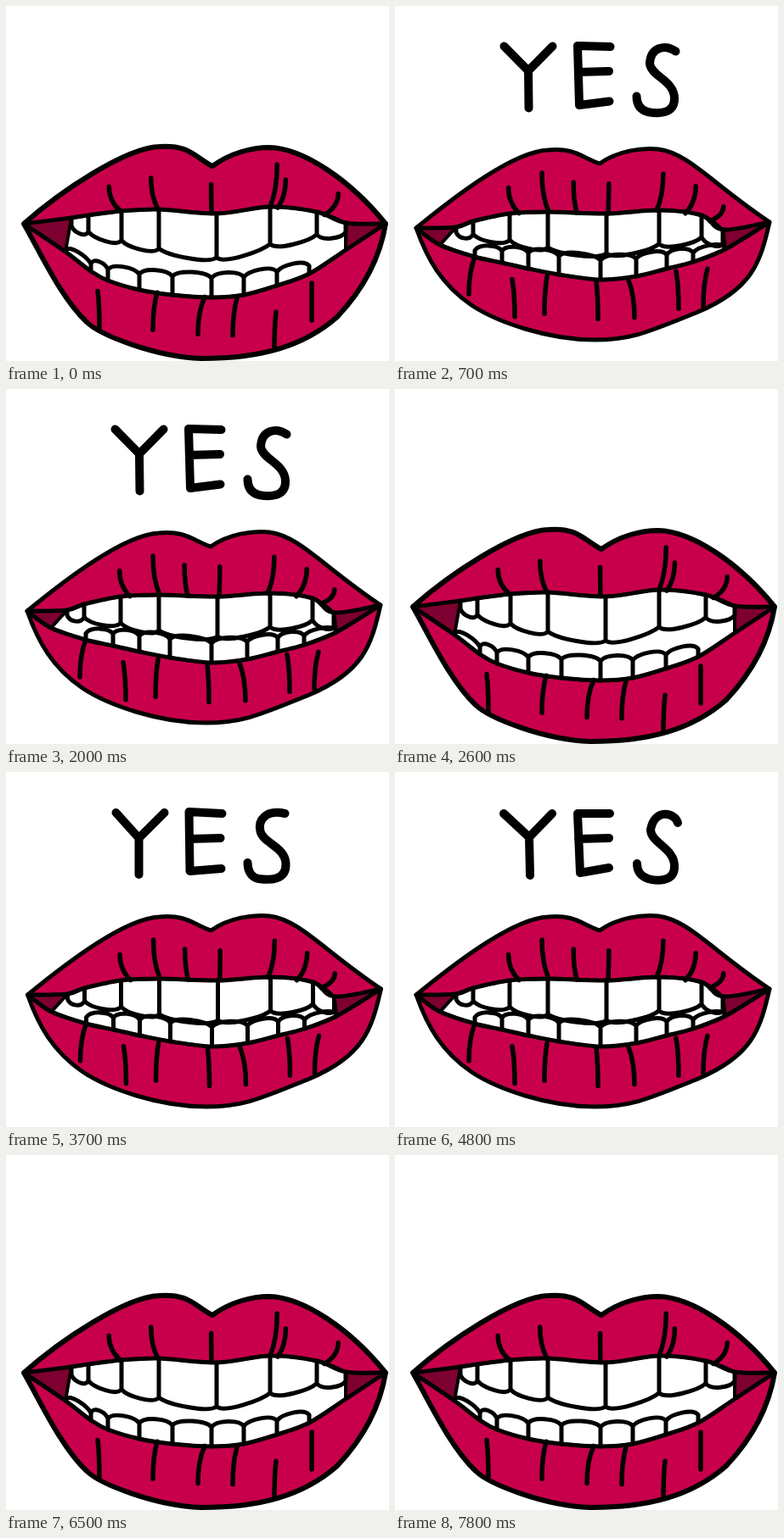
An HTML page with a canvas for the animation above (8 s loop, 451 by 419 pixels).

```html
<!DOCTYPE html>
<html lang="en">
<head>
<meta charset="utf-8">
<title>Yes</title>
<style>
html, body { margin: 0; width: 100%; height: 100%; overflow: hidden; background: #fff; }
canvas { display: block; }
</style>
</head>
<body>
<canvas id="stage" width="451" height="419"></canvas>
<script>
const ctx = document.getElementById("stage").getContext("2d");
const RED = "#c8004b", DARK = "#7d0030";

// Each shape has two poses with matching numbers, so it can be blended.
const lips = [
  `M21,257 C65,218 140,168 180,166 C215,163 222,178 243,189
   C265,173 290,167 310,167 C350,168 405,205 447,257
   C440,300 420,335 390,367 C350,402 300,416 230,416
   C175,414 110,388 95,373 C65,345 40,290 21,257 Z`,
  `M25,263 C75,222 140,173 180,171 C212,168 220,180 241,187
   C262,172 290,168 310,170 C345,174 375,212 441,256
   C430,305 420,335 357,362 C300,385 280,395 235,395
   C180,395 120,374 90,354 C55,330 38,300 25,263 Z`];

// Inner lip edges; their points are also the gaps between the teeth.
const upperEdge = [
  "21,257 77,250 97,247 136,242 180,240 248,245 311,237 366,243 400,256 447,257",
  "25,263 72,262 92,255 135,246 180,244 249,246 311,242 361,248 386,265 441,256"];
const lowerEdge = [
  "21,257 70,290 100,313 120,324 157,335 196,341 242,344 280,341 319,330 357,316 400,288 447,257",
  "25,263 53,283 94,297 126,304 157,311 193,318 242,324 284,320 320,311 351,303 389,288 441,256"];

const word = [
  `M129,48 L156,78 L186,48 M156,78 L156,121
   M254,49 L215,47 L216,117 L253,114 M216,79 L252,78
   M328,49 C305,44 296,57 299,70 C302,84 328,88 329,108
   C330,128 310,128 297,126 C287,124 284,115 284,107`,
  `M128,49 L158,77 L185,49 M158,77 L159,122
   M253,49 L215,49 L218,119 L252,113 M216,79 L252,78
   M333,60 C330,48 306,42 301,68 C301,84 330,90 329,112
   C329,130 308,129 298,126 C287,122 285,115 285,108`];

// Creases: [x, length] above the mouth, [x, gap, lean] below it.
const openCreases = {
  upper: [[135, 29], [179, 37], [242, 34], [311, 50], [320, 33], [375, 25]],
  lower: [[108, 19, 2], [178, 0, -5], [234, 0, -8], [272, 3, -5], [318, 31, -2], [360, 13, 0]]
};
const closedCreases = {
  upper: [[146, 30], [181, 46], [214, 36], [251, 35], [308, 43], [342, 32], [371, 17]],
  lower: [[94, 0, -7], [138, 17, 3], [179, 5, -3], [237, 3, 2], [275, 4, 7], [331, 6, 3], [368, 15, -5]]
};

const lerp = (a, b, k) => a + (b - a) * k;

function blend([from, to], k) {
  const ends = to.match(/\d+/g);
  let i = 0;
  return from.replace(/\d+/g, n => lerp(+n, +ends[i++], k));
}

const blendPoints = (pair, k) =>
  blend(pair, k).split(" ").map(p => p.split(",").map(Number));

// Catmull-Rom curve through the points.
function curve(path, points, join) {
  if (!join) path.moveTo(...points[0]);
  for (let i = 0; i < points.length - 1; i++) {
    const b = points[i], c = points[i + 1];
    const a = points[i - 1] || b, d = points[i + 2] || c;
    path.bezierCurveTo(
      b[0] + (c[0] - a[0]) / 6, b[1] + (c[1] - a[1]) / 6,
      c[0] - (d[0] - b[0]) / 6, c[1] - (d[1] - b[1]) / 6, ...c);
  }
}

function between(top, bottom) {
  const path = new Path2D();
  curve(path, top);
  path.lineTo(...bottom.at(-1));
  curve(path, [...bottom].reverse(), true);
  path.closePath();
  return path;
}

function fill(path, color) {
  ctx.fillStyle = color;
  ctx.fill(path);
}

function ink(path, width) {
  ctx.lineWidth = width;
  ctx.stroke(path);
}

function heightAt(edge, x) {
  const i = edge.findIndex(p => p[0] > x);
  const [a, b] = [edge[i - 1], edge[i]];
  return lerp(a[1], b[1], (x - a[0]) / (b[0] - a[0]));
}

// Teeth are longest at the centre and shrink towards the corners.
function addTeeth(path, edge, side, center, radius, longest) {
  const length = x => longest * Math.max(0, 1 - ((x - center) / radius) ** 2);
  const tips = edge.map(([x, y]) => [x, y + side * length(x)]);
  edge.forEach(([x, y], i) => {
    if (!length(x)) return;
    path.moveTo(x, y);
    path.lineTo(...tips[i]);
    if (!length(edge[i + 1][0])) return;
    const [x0, y0] = tips[i], [x1, y1] = tips[i + 1], bulge = side * 8;
    path.bezierCurveTo(lerp(x0, x1, 0.15), y0 + bulge, lerp(x0, x1, 0.85), y1 + bulge, x1, y1);
  });
}

function addCrease(path, x, y, lean, rise) {
  path.moveTo(x, y);
  path.quadraticCurveTo(x + lean, y + rise * 0.4, x + lean, y + rise);
}

function drawMouth(closed) {
  const outline = new Path2D(blend(lips, closed));
  const top = blendPoints(upperEdge, closed), bottom = blendPoints(lowerEdge, closed);
  const cavity = between(top, bottom);
  const teethArea = between(top.slice(1, -1), bottom.slice(1, -1));

  fill(outline, RED);
  fill(cavity, DARK);
  fill(teethArea, "#fff");

  const teeth = new Path2D();
  addTeeth(teeth, top, 1, 240, 180, lerp(52, 47, closed));
  addTeeth(teeth, bottom, -1, 230, 165, 23);
  ink(teeth, 5);
  ink(teethArea, 4);

  const creases = new Path2D();
  const { upper, lower } = closed ? closedCreases : openCreases;
  for (const [x, length] of upper) {
    addCrease(creases, x, heightAt(top, x), (x - 245) / 8, -length);
  }
  for (const [x, gap, lean] of lower) {
    addCrease(creases, x, heightAt(bottom, x) + gap, lean, 44);
  }
  ink(creases, 5.5);
  ink(cavity, 5);
  ink(outline, lerp(6, 5, closed));
}

function draw(time) {
  const t = time % 8000 % 1300;
  ctx.fillStyle = "#fff";
  ctx.fillRect(0, 0, 451, 419);
  ctx.lineCap = ctx.lineJoin = "round";
  ctx.strokeStyle = "#000";
  if (t < 400) {
    drawMouth(t < 200 ? 0 : 0.5);
    return;
  }
  // Three slightly different drawings take turns while the word is shown.
  const turn = Math.floor((t - 400) / 100) % 3;
  ctx.save();
  ctx.translate(turn === 1 ? 0.5 : 0, turn === 0 ? -1 : 0);
  drawMouth(1);
  ink(new Path2D(blend(word, [0.5, 0, 1][turn])), 10);
  ctx.restore();
}

let start;
function tick(now) {
  start ??= now;
  draw(now - start);
  requestAnimationFrame(tick);
}
draw(0);
requestAnimationFrame(tick);
</script>
</body>
</html>
```
